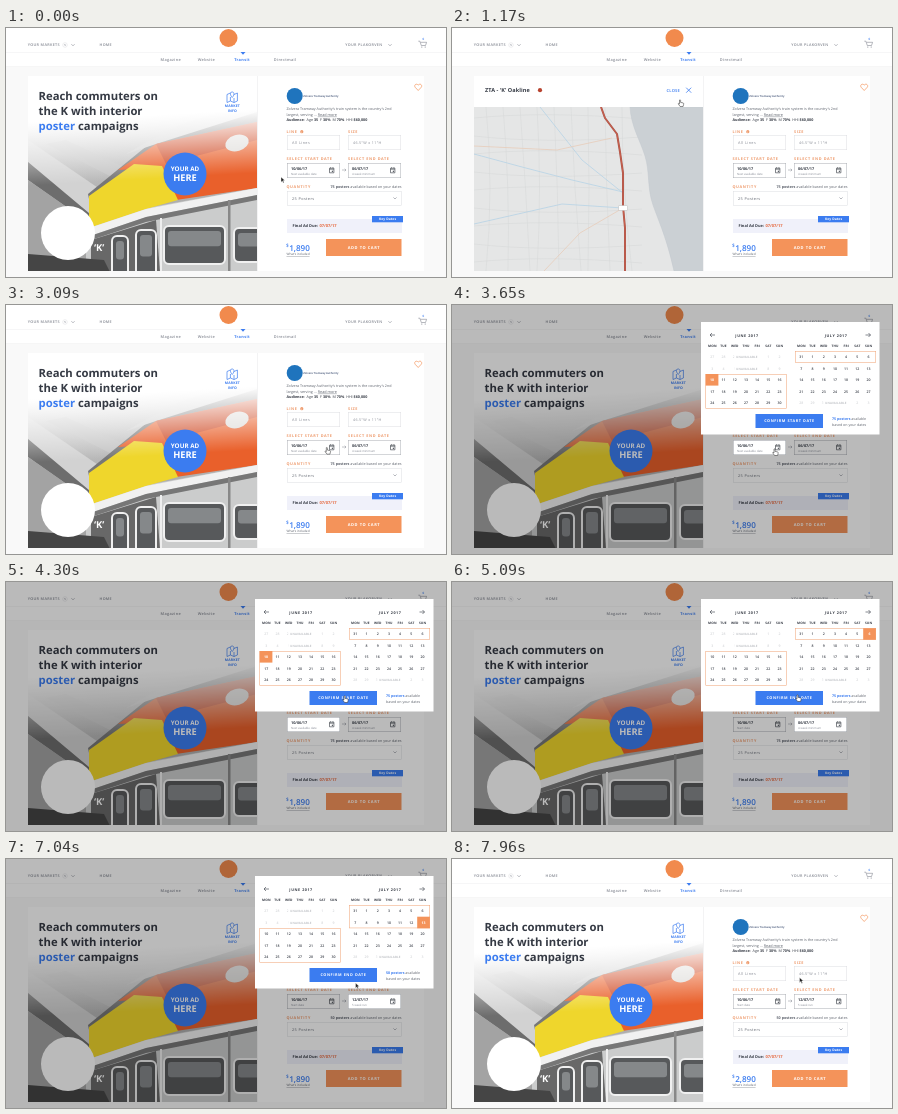
These frames come from a looping animation (440 by 249 pixels, 8 s). An HTML page:

```html
<!DOCTYPE html>
<html lang="en">
<head>
<meta charset="utf-8">
<title>Poster booking</title>
<style>
html, body { margin: 0; width: 100%; height: 100%; overflow: hidden; background: #f9f9f9; }
svg { display: block; width: 100vw; height: 100vh; }
text { font-family: "Open Sans", "Noto Sans", sans-serif; white-space: pre; text-rendering: geometricPrecision; }
</style>
</head>
<body>
<svg id="stage" viewBox="0 0 440 249" preserveAspectRatio="none"></svg>
<script>
const LOOP = 8000;
const ORANGE = '#f4935a', BLUE = '#3b7cf0', INK = '#353a44', GREY = '#858993', LINE = '#dcdde1';
const LABEL = '#ee9a6c', BODY = '#5d626c';

const text = (x, y, s, size, fill = INK, weight = 400, gap = 0, more = '') =>
  `<text x="${x}" y="${y}" font-size="${size}" fill="${fill}" font-weight="${weight}" letter-spacing="${gap}" ${more}>${s}</text>`;
const mid = (x, y, s, size, fill, weight, gap = 0) =>
  text(x + gap / 2, y, s, size, fill, weight, gap, 'text-anchor="middle"');
const rect = (x, y, w, h, fill, more = '') =>
  `<rect x="${x}" y="${y}" width="${w}" height="${h}" fill="${fill}" ${more}/>`;
const box = (x, y, w, h, stroke = LINE, fill = '#fff') =>
  rect(x + .25, y + .25, w - .5, h - .5, fill, `stroke="${stroke}" stroke-width=".5"`);
const poly = (points, fill) => `<polygon points="${points}" fill="${fill}"/>`;
const path = (d, stroke, w = .6, fill = 'none') =>
  `<path d="${d}" fill="${fill}" stroke="${stroke}" stroke-width="${w}" stroke-linejoin="round"/>`;
const dot = (x, y, r, fill, more = '') => `<circle cx="${x}" cy="${y}" r="${r}" fill="${fill}" ${more}/>`;
const chevron = (x, y, color = GREY) => path(`M${x - 1.6} ${y - .8}l1.6 1.6l1.6-1.6`, color);

function header() {
  return rect(0, 0, 440, 249, '#f9f9f9') + rect(0, 0, 440, 38, '#fff') +
    rect(0, 24, 440, .5, '#ececee') + rect(0, 38, 440, .4, '#efeff0') +
    text(21.7, 18.3, 'YOUR MARKETS', 3.75, GREY, 600, .33) +
    dot(59, 17, 2.3, 'none', `stroke="${LINE}" stroke-width=".5"`) + mid(59, 18, '5', 2.8, GREY, 600) +
    chevron(67, 17) +
    text(93.6, 18.3, 'HOME', 3.7, GREY, 600, .3) +
    dot(222.5, 10, 9, '#f18a4d') +
    text(339.3, 18.3, 'YOUR PLAKORVEN', 3.7, GREY, 600, .33) + chevron(384, 17) +
    path('M412.3 13.2h1.6l1.4 4.3h4.2l1.1-3.2h-6', GREY, .6) + dot(415.8, 19, .6, GREY) + dot(419.2, 19, .6, GREY) +
    mid(417.3, 12.3, '0', 3, BLUE, 600) +
    text(154.5, 33, 'Magazine', 3.85, GREY, 600, .35) + text(191.7, 33, 'Website', 3.85, GREY, 600, .35) +
    text(228.2, 33, 'Transit', 3.85, BLUE, 700, .35) + text(267.8, 33, 'Directmail', 3.85, GREY, 600, .35) +
    poly('234.5,24 239.5,24 237,26.8', BLUE);
}

// Flat rendering of the train interior behind the headline.
function photo() {
  const pane = (x, y, w, h) => rect(x, y, w, h, '#57595b', 'rx="5" stroke="#f0f0f0" stroke-width="2"') +
    rect(x + 4, y + 5, w - 8, h * .4, '#85888a', 'rx="3"');
  return `<g clip-path="url(#hero)">` + rect(22, 48, 230, 196, 'url(#roof)') +
    poly('22,112 104,168 84,186 22,134', '#d2d2d2') +
    poly('22,134 84,186 82,194 22,152', '#6d6d6d') +
    poly('22,152 82,194 90,244 22,244', '#a3a3a3') +
    poly('60,112 120,140 108,150 40,116', '#c4c4c4') +
    poly('82,166 148,112 251,76 251,100 150,122 84,176', '#777') +
    poly('120,126 170,98 251,72 251,84 150,116', '#cfcfcf') +
    poly('80,200 140,180 251,160 251,244 80,244', '#cbcccc') +
    poly('112,142 150,116 251,94 251,160 170,172 150,140', '#e9602b') +
    poly('150,116 251,94 251,112 160,136', '#cf4a25') +
    poly('83,168 128,136 156,138 172,172 140,181 83,200', '#efd62c') +
    `<ellipse cx="231" cy="115" rx="12" ry="8" fill="#dedcd9" transform="rotate(-16 231 115)"/>` +
    poly('83,200 140,181 251,160 251,167 140,189 84,208', '#f1f1f1') +
    poly('84,208 140,189 251,167 251,172 140,194 85,212', '#777') +
    poly('85,212 150,192 154,244 85,244', '#686868') +
    pane(106, 208, 16, 46) + pane(130, 202, 20, 54) +
    pane(158, 198, 61, 38) + pane(228, 200, 32, 34) +
    rect(154, 190, 2, 54, '#eee') + rect(222, 172, 2.5, 72, '#888') +
    poly('22,226 98,232 104,244 22,244', '#454545') +
    rect(22, 48, 230, 110, 'url(#fade)') + '</g>';
}

function hero() {
  return rect(22, 48, 396, 195, '#fff') + photo() +
    text(32.6, 71.5, 'Reach commuters on', 11.3, INK, 700) +
    text(32.6, 86.5, 'the K with interior', 11.3, INK, 700) +
    text(32.6, 101.5, `<tspan fill="${BLUE}">poster</tspan> campaigns`, 11.3, INK, 700) +
    path('M221 66.5l3.4-1.5l3.6 1.5l3.4-1.5v8l-3.4 1.5l-3.6-1.5l-3.4 1.5zM224.4 69v4M228 70v4.5', BLUE, .7) +
    path('M226.2 69.5c-3-3.5-1.6-5.5 0-5.5s3 2 0 5.5z', BLUE, .7, '#fff') +
    mid(226.3, 79.3, 'MARKET', 3.5, BLUE, 700, .15) + mid(226.3, 83.6, 'INFO', 3.5, BLUE, 700, .15) +
    dot(179, 146, 21.5, BLUE) + mid(179, 143.3, 'YOUR AD', 6.3, '#fff', 700) + mid(179, 153, 'HERE', 9.3, '#fff', 700) +
    dot(62, 205, 27, '#fff') + text(88, 223, '‘K’', 9.5, '#fff', 700) +
    rect(251.3, 48, .5, 195, '#e6e6e8');
}

function mapPanel() {
  let roads = '';
  for (let i = 0; i < 9; i++) {
    const x = 34 + i * 17, y = 90 + i * 18;
    roads += path(`M${x} 79q${8 - i} 80 ${i % 3 * 5} 164M22 ${y}q70 ${i % 2 ? 8 : -7} 168 1`, '#d4d6d7', .5);
  }
  const track = 'M149 79L153 90L165 106L168 124L171 145V178L173 200V243';
  return rect(22, 48, 229, 195, '#fff') +
    `<g clip-path="url(#map)">` + rect(22, 79, 229, 164, '#e5e6e6') + roads +
    path('M171 164L120 152L70 139L22 126M171 180L110 176L22 196M171 165L130 132L88 79', '#b7d3e6', .8) +
    path('M171 180L128 205L92 243M160 110L105 122L22 118', '#e8c9b4', .7) +
    path('M178 79C179 98 188 112 193 128S195 160 201 177S215 211 222 243H252V79z', '#c3c9ce', .5, '#cbd0d4') +
    path(track, '#a9574c', 2) + path(track, '#d2614c', .8) +
    rect(166.5, 177.5, 9, 5, '#fff', 'rx="1" stroke="#aaa" stroke-width=".4"') + '</g>' +
    text(33, 64.2, 'ZTA - ‘K’ Oakline', 5.5, INK, 700, .1) + dot(88, 62.2, 2.1, '#b8432f') +
    text(214.5, 64, 'CLOSE', 4.1, BLUE, 600, .2) + path('M234.2 59.7l5 5m0-5l-5 5', BLUE, .8);
}

function dateField(x, date, note) {
  const cx = x + 42.5;
  return box(x, 135, 53, 15, '#a9acb2') + text(x + 4, 141.7, date, 3.8, INK, 700) +
    text(x + 4, 146.6, note, 2.9, GREY) +
    path(`M${cx} 140.2h4.4v4.6h-4.4zM${cx} 141.2h4.4M${cx + 1} 139.3v1M${cx + 3.4} 139.3v1`, '#4b4f57', .7) +
    rect(cx + 2.3, 142.7, 1.2, 1.2, '#4b4f57');
}

function order(s) {
  const facts = [['Age', '35'], ['F', '30%'], ['M', '70%'], ['HHI', '$60,000']]
    .map(([k, v]) => `  <tspan font-weight="400">${k}</tspan> ${v}`).join('');
  return path('M412.2 62.5l-3-3.2c-1.6-2 1-4.5 3-2.2c2-2.3 4.6.2 3 2.2z', ORANGE, .7) +
    dot(288.7, 68, 8, '#1f74bd') + text(297.3, 69.2, 'Zolvera Tramway Authority', 2.7, '#3a4c70', 600) +
    text(280.5, 82.2, 'Zolvera Tramway Authority’s train system is the country’s 2nd', 3.7, BODY) +
    text(280.5, 87.7, 'largest, serving ... <tspan text-decoration="underline">Read more</tspan>', 3.75, BODY) +
    text(280.5, 93.2, 'Audience:' + facts, 3.7, INK, 700) +
    text(280.5, 105, 'LINE', 3.8, LABEL, 700, .6) + dot(295.8, 103.7, 1.6, LABEL) + mid(295.8, 104.7, 'i', 2.5, '#fff', 700) +
    text(342, 105, 'SIZE', 3.8, LABEL, 700, .6) +
    box(281, 107, 53, 15) + text(286, 116, 'All Lines', 3.8, GREY, 400, .4) +
    box(342, 107, 53, 15) + text(347, 116, '46.5"W x 11"H', 3.7, GREY, 400, .3) +
    text(280.5, 132.3, 'SELECT START DATE', 3.8, LABEL, 700, .6) + text(342, 132.3, 'SELECT END DATE', 3.8, LABEL, 700, .6) +
    dateField(281, '10/06/17', s.startNote) + path('M336 142h4m-1.3-1.3l1.3 1.3l-1.3 1.3', GREY, .5) +
    dateField(342, s.end, s.endNote) +
    text(280.5, 160.3, 'QUANTITY', 3.8, LABEL, 700, .6) +
    text(395.5, 160.3, `<tspan font-weight="700">${s.count} posters</tspan> available based on your dates`, 3.7, BODY, 400, 0, 'text-anchor="end"') +
    box(281, 163, 114.5, 14.5) + text(286, 171.7, '25 Posters', 3.8, BODY, 400, .4) + chevron(389, 170.2) +
    rect(281, 191, 115, 14, '#f0f1fa') + text(286.5, 199.4, 'Final Ad Due:', 3.9, INK, 700) +
    text(313.5, 199.4, '07/07/17', 4, '#e5673c', 700) +
    rect(366, 188, 31, 6.3, BLUE) + mid(381.5, 192.4, 'Key Dates', 3.3, '#fff', 700, .1) +
    text(280, 219.2, '$', 4.8, BLUE, 600) + text(283.2, 222.7, s.price, 8.1, BLUE, 600) +
    text(280.5, 227.4, 'What’s included', 3.15, BODY, 400, 0, 'text-decoration="underline"') +
    rect(320, 211, 75.5, 17, ORANGE) + mid(357.7, 221, 'ADD TO CART', 4, '#fff', 700, .55);
}

// Five weeks starting at day `first`; closed weeks are greyed and labelled.
function month(left, name, first, closed) {
  const names = ['MON', 'TUE', 'WED', 'THU', 'FRI', 'SAT', 'SUN'];
  let out = mid(left + 34.5, 31.7, name, 3.7, INK, 700, .55);
  for (let i = 0; i < 35; i++) {
    const x = left + i % 7 * 11.2, row = Math.floor(i / 7);
    if (!row) out += mid(x, 42, names[i], 3.2, INK, 700, .15);
    out += mid(x, 53.3 + row * 11.5, (first + i - 1) % 31 + 1, 3.5, closed.includes(row) ? '#d3d5d8' : INK, 600);
  }
  for (const row of closed)
    out += rect(left + 22, 49.5 + row * 11.5, 25, 5, '#fff') + mid(left + 34.5, 53.2 + row * 11.5, 'UNAVAILABLE', 3, '#b4b7bc', 600, .15);
  return out;
}

function picker(s) {
  const mark = (x, y, day) => rect(x, y, 12.7, 11.6, ORANGE) + mid(x + 6.3, y + 7.2, day, 3.5, '#fff', 700);
  const range = (x, y, w, h) => box(x, y, w, h, '#f0a071', 'none');
  const starting = s.picking === 'START';
  const field = starting ? dateField(281, '10/06/17', s.startNote) : dateField(342, s.end, s.endNote);
  const chosen = starting ? mark(253.7, 69, 10) : s.longer ? mark(411.2, 57.7, 13) : mark(411.2, 46.2, 6);
  return rect(0, 0, 440, 249, '#000', 'opacity=".27"') + field + rect(249, 17, 178.5, 112.5, '#fff') +
    path('M263 30h-5m2-2l-2 2l2 2M413.5 30h5m-2-2l2 2l-2 2', INK, .6) +
    month(260.3, 'JUNE 2017', 27, [0, 1]) + month(349.3, 'JULY 2017', 31, [4]) +
    range(253.5, 69, 81, 34.5) + range(343, 46, 81, s.longer ? 23.2 : 11.7) + chosen +
    rect(303.5, 109, 67.5, 14, BLUE) + mid(337.2, 117.4, `CONFIRM ${s.picking} DATE`, 3.8, '#fff', 700, .55) +
    text(380, 115.3, `<tspan fill="${BLUE}" font-weight="700">${s.count} posters</tspan> available`, 3.6, BODY) +
    text(380, 120.5, 'based on your dates', 3.6, BODY);
}

const arrow = path('M0 0v5.2l1.3-1.2l.9 2l.9-.4l-.9-2h1.7z', '#fff', .4, '#222');
const hand = path('M0 0c.8-.5 1.1 0 1.1.7v1.7l2.4.5c.7.2.8.8.6 1.6l-.5 2h-3l-1.8-2.5c-.3-.7.4-.9 1.2-.1z', '#333', .55, '#fff');

document.getElementById('stage').innerHTML = `<defs>
  <clipPath id="hero"><rect x="22" y="48" width="229" height="195"/></clipPath>
  <clipPath id="map"><rect x="22" y="79" width="229" height="164"/></clipPath>
  <linearGradient id="roof" x1="0" y1="0" x2="0" y2="1"><stop offset=".2" stop-color="#d8d8d8"/><stop offset="1" stop-color="#8c8c8c"/></linearGradient>
  <linearGradient id="fade" x1=".3" y1="0" x2=".42" y2="1"><stop offset=".38" stop-color="#fff"/><stop offset=".95" stop-color="#fff" stop-opacity="0"/></linearGradient>
  </defs>` + header() + hero() +
  `<g id="order"></g><g id="market">${mapPanel()}</g><g id="picker"></g>
  <g id="cursor"><g id="arrow">${arrow}</g><g id="hand">${hand}</g></g>`;
const [orderEl, marketEl, pickerEl, cursorEl, arrowEl, handEl] =
  ['order', 'market', 'picker', 'cursor', 'arrow', 'hand'].map(id => document.getElementById(id));

// Pointer stops: time, x, y.
const stops = [[0, 275, 149], [560, 227, 72], [1170, 227.5, 72], [1600, 236, 61], [1850, 236, 61],
  [2220, 227, 68], [2400, 227, 69], [3150, 322, 144], [3700, 322, 144], [4150, 338, 114], [4500, 338, 114],
  [5090, 345, 113], [5300, 346, 112], [6000, 420, 63], [6350, 420, 63], [7000, 349.5, 124],
  [7150, 349.5, 124], [7500, 347.5, 118.5], [8000, 347.5, 118.5]];
const smooth = p => { p = Math.min(1, Math.max(0, p)); return p * p * (3 - 2 * p); };
const pulse = (t, from, to, span) => smooth((t - from) / span) - smooth((t - to) / span);
const within = (t, a, b) => t >= a && t < b;

function stateAt(t) {
  const started = t >= 4350, longer = t >= 6100;
  return {
    longer, picking: started ? 'END' : 'START',
    startNote: started ? 'Start date' : 'Next available date',
    end: longer ? '12/07/17' : '06/07/17', endNote: longer ? '5 week run' : '4 week minimum',
    count: longer ? 50 : 75, price: t >= 7650 ? '2,890' : '1,890'
  };
}

let shown = '';
function render(t) {
  const state = stateAt(t), key = JSON.stringify(state);
  if (key !== shown) {
    shown = key;
    orderEl.innerHTML = order(state);
    pickerEl.innerHTML = picker(state);
  }
  marketEl.setAttribute('opacity', pulse(t, 640, 1760, 200));
  pickerEl.setAttribute('opacity', pulse(t, 3400, 7650, 200));

  const i = Math.max(1, stops.findIndex(s => s[0] > t));
  const [t0, x0, y0] = stops[i - 1], [t1, x1, y1] = stops[i], p = smooth((t - t0) / (t1 - t0));
  cursorEl.setAttribute('transform', `translate(${x0 + (x1 - x0) * p} ${y0 + (y1 - y0) * p})`);
  const linked = within(t, 480, 2500) || within(t, 3000, 3800) || within(t, 4050, 5350) ||
    within(t, 5850, 6450) || within(t, 7300, 7700);
  handEl.setAttribute('visibility', linked ? 'visible' : 'hidden');
  arrowEl.setAttribute('visibility', linked ? 'hidden' : 'visible');
}

const begun = performance.now();
function tick() {
  render(Math.max(0, performance.now() - begun) % LOOP);
  requestAnimationFrame(tick);
}
tick();
</script>
</body>
</html>
```
